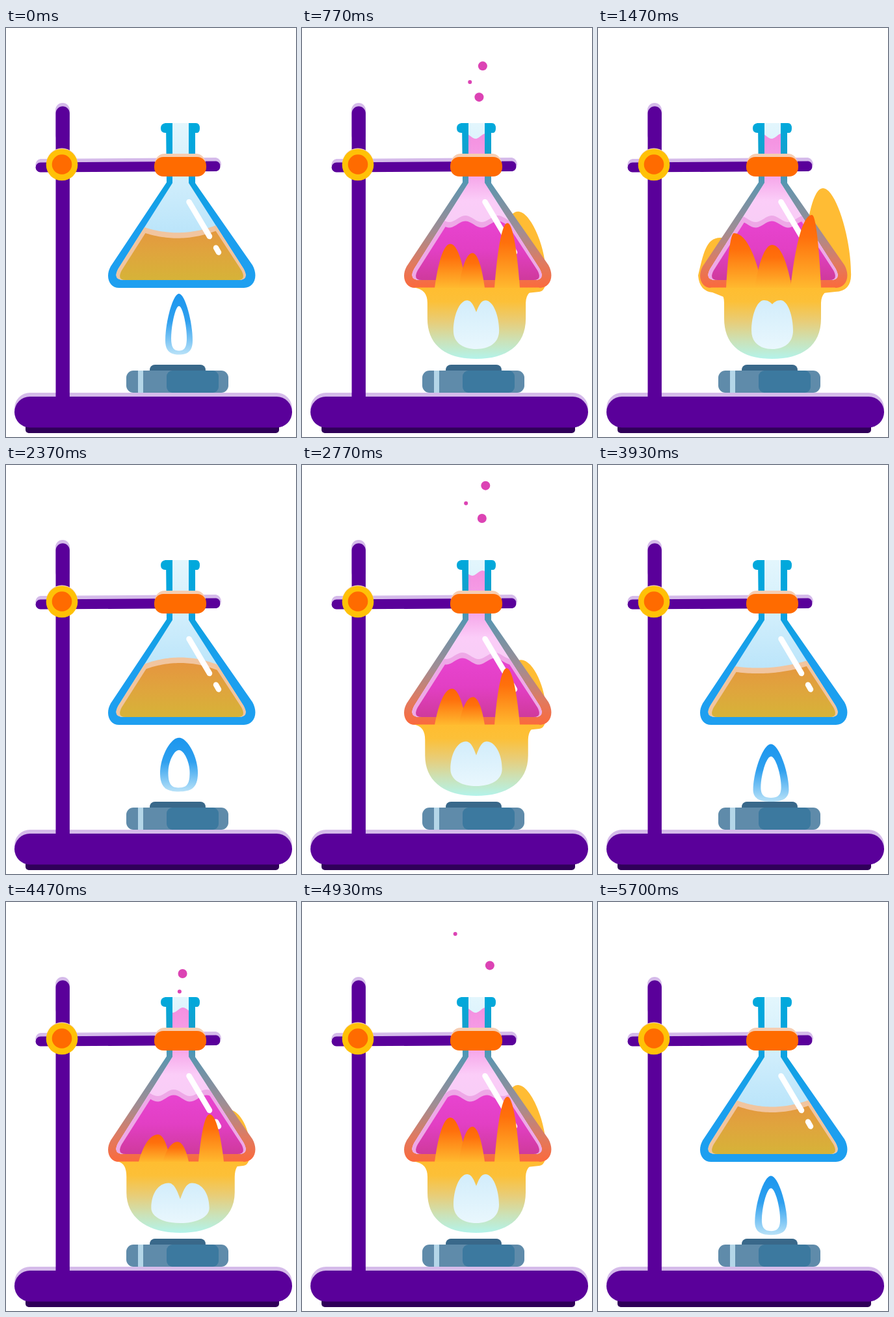
These frames come from a looping animation (446x628 px, 5730 ms). An HTML page:

```html
<!DOCTYPE html>
<html lang="en">
<head>
<meta charset="utf-8">
<title>Flask over a burner</title>
<style>
html, body { margin: 0; width: 100%; height: 100%; overflow: hidden; background: #fff; }
svg { display: block; width: 100vw; height: 100vh; }
</style>
</head>
<body>
<svg viewBox="0 0 446 628">
  <defs>
    <linearGradient id="glassCold" gradientUnits="userSpaceOnUse" x1="0" y1="146" x2="0" y2="399">
      <stop offset="0" stop-color="#00a9dc"/><stop offset=".3" stop-color="#0aa2dd"/>
      <stop offset=".6" stop-color="#1a9fee"/><stop offset="1" stop-color="#1e9ff0"/>
    </linearGradient>
    <linearGradient id="glassHot" gradientUnits="userSpaceOnUse" x1="0" y1="146" x2="0" y2="399">
      <stop offset="0" stop-color="#00a9dc"/><stop offset=".2" stop-color="#16a0cc"/>
      <stop offset=".4" stop-color="#6594ac"/><stop offset=".65" stop-color="#a08d94"/>
      <stop offset=".85" stop-color="#e07a60"/><stop offset="1" stop-color="#fb6a3c"/>
    </linearGradient>
    <linearGradient id="airCold" gradientUnits="userSpaceOnUse" x1="0" y1="146" x2="0" y2="320">
      <stop offset="0" stop-color="#e3f6fd"/><stop offset=".45" stop-color="#d3effc"/>
      <stop offset="1" stop-color="#b9e4fa"/>
    </linearGradient>
    <linearGradient id="airHot" gradientUnits="userSpaceOnUse" x1="0" y1="160" x2="0" y2="300">
      <stop offset="0" stop-color="#f48fe0"/><stop offset=".5" stop-color="#f6a8ea"/>
      <stop offset=".75" stop-color="#fbcdf8"/><stop offset="1" stop-color="#f8cdf6"/>
    </linearGradient>
    <linearGradient id="orange" gradientUnits="userSpaceOnUse" x1="0" y1="305" x2="0" y2="387">
      <stop offset="0" stop-color="#e5963f"/><stop offset=".5" stop-color="#dfa53d"/>
      <stop offset="1" stop-color="#d6b338"/>
    </linearGradient>
    <linearGradient id="pink" gradientUnits="userSpaceOnUse" x1="0" y1="295" x2="0" y2="387">
      <stop offset="0" stop-color="#e844d0"/><stop offset=".5" stop-color="#e23fc4"/>
      <stop offset="1" stop-color="#cf3a9c"/>
    </linearGradient>
    <linearGradient id="tongue" x1="0" y1="0" x2="0" y2="1">
      <stop offset="0" stop-color="#ff6408"/><stop offset=".3" stop-color="#ff700c"/>
      <stop offset="1" stop-color="#ffb92f"/>
    </linearGradient>
    <linearGradient id="bodyFire" gradientUnits="userSpaceOnUse" x1="0" y1="398" x2="0" y2="508">
      <stop offset="0" stop-color="#ffbd30"/><stop offset=".2" stop-color="#fcc038"/>
      <stop offset=".48" stop-color="#e8cd78"/><stop offset=".75" stop-color="#cbe2b8"/>
      <stop offset="1" stop-color="#b3f3ea"/>
    </linearGradient>
    <linearGradient id="coreFire" x1="0" y1="0" x2="0" y2="1">
      <stop offset="0" stop-color="#d2edfb"/><stop offset="1" stop-color="#e9f7fd"/>
    </linearGradient>
    <linearGradient id="blueFire" x1="0" y1="0" x2="0" y2="1">
      <stop offset="0" stop-color="#1b96ee"/><stop offset=".45" stop-color="#2fa0ef"/>
      <stop offset="1" stop-color="#b9e2f8"/>
    </linearGradient>
    <clipPath id="inside"><path d="M256 146V238L173 369Q163 387 181 387H358Q375 387 365 369L281 238V146Z"/></clipPath>
    <clipPath id="inset"><path d="M259 245L178 372Q170 387 184 387H356Q370 387 362 372L279 245Z"/></clipPath>
  </defs>

  <g id="stand">
    <rect x="30" y="606" width="390" height="16" rx="5" fill="#300059"/>
    <rect x="76" y="115" width="22" height="60" rx="11" fill="#d5bbea"/>
    <rect x="13" y="560" width="427" height="50" rx="24" fill="#d5bbea"/>
    <rect x="13" y="566" width="427" height="47.500" rx="23.700" fill="#5a009a"/>
    <path d="M76.500 570V131a10.700 10.700 0 0 1 21.400 0V570Z" fill="#5a009a"/>
    <path d="M53 201L323 199Q331 201 331 211L45 211Q46 202 53 201Z" fill="#d5bbea"/>
    <path d="M53 206.500L323.500 204.500a8 8 0 0 1 0 15.500L53 221.500a7.500 7.500 0 0 1 0 -15Z" fill="#5a009a"/>
    <circle cx="86" cy="208.500" r="24" fill="#f3cfae"/>
    <circle cx="86" cy="210" r="24.300" fill="#ffc107"/>
    <circle cx="86" cy="209.500" r="15.300" fill="#ff6b00"/>
  </g>

  <g id="burner">
    <rect x="221" y="517" width="86" height="16" rx="8" fill="#39688a"/>
    <rect x="185" y="526" width="157" height="34" rx="11" fill="#5f8baa"/>
    <path d="M203 526h8v34h-8Z" fill="#b4d6e8"/>
    <rect x="247" y="526" width="80" height="34" rx="9" fill="#3c799f"/>
  </g>

  <g id="drops" fill="#dc43b4"></g>
  <g id="fireBack" fill="#ffbc34"><path id="plume"/><path id="bulge"/></g>

  <g id="flask">
    <path id="glass" d="M246 146H291V238L379 364C389 382 381 399 366 399H174C159 399 152 382 161 366L247 237Z
      M245 146H292Q298 146 298 154T292 161H245Q238 161 238 154T245 146Z"/>
    <g clip-path="url(#inside)">
      <rect x="150" y="146" width="240" height="245" fill="url(#airCold)"/>
      <path id="vapour" fill="url(#airHot)"/>
      <path id="rim"/>
    </g>
    <path id="liquid" clip-path="url(#inset)"/>
    <path d="M281.500 267L313 320M323 337.500L327 344.500" stroke="#fff" stroke-width="8.500" stroke-linecap="round"/>
    <rect x="229" y="193" width="78" height="30" rx="15" fill="#f6cdb2"/>
    <rect x="228" y="198" width="80" height="30" rx="14" fill="#ff6b00"/>
  </g>

  <g id="fireFront">
    <path id="body" fill="url(#bodyFire)"/>
    <g fill="url(#tongue)"><path id="left"/><path id="mid"/><path id="right"/></g>
    <path id="core" fill="url(#coreFire)"/>
  </g>
  <g id="flame">
    <path id="outer" fill="url(#blueFire)"/>
    <path id="inner" fill="#fff"/>
  </g>
</svg>
<script>
const LOOP = 5730, FRAMES = 143, CYCLE = FRAMES / 3;
const BURST = 12, CALM = 39;
const BOB = BURST * 0.472, SLOSH = 24.6, FLICKER = 8.33;
const TAU = Math.PI * 2;

const el = id => document.getElementById(id);
const put = (id, d) => el(id).setAttribute('d', d);
const fill = (id, value) => el(id).setAttribute('fill', value);
const show = (node, on) => node.setAttribute('visibility', on ? 'visible' : 'hidden');
const clamp = v => Math.min(1, Math.max(0, v));

const drops = [0, 1, 2].map(i => {
  const small = i % 2;
  const node = document.createElementNS('http://www.w3.org/2000/svg', 'circle');
  node.setAttribute('r', small ? 3 : 7);
  el('drops').appendChild(node);
  return { node, launch: 13.8 + 1.44 * i, fall: 0.72 * 1.43 ** i, drift: small ? -2.6 : 1.9 };
});

function tear(cx, top, bottom, w, wide) {
  const h = bottom - top, y = top + h * wide;
  return `M${cx} ${top}C${cx + w * .45} ${top} ${cx + w} ${y - h * .3} ${cx + w} ${y}` +
    `C${cx + w} ${bottom - h * .05} ${cx + w * .6} ${bottom} ${cx} ${bottom}` +
    `C${cx - w * .6} ${bottom} ${cx - w} ${bottom - h * .05} ${cx - w} ${y}` +
    `C${cx - w} ${y - h * .3} ${cx - w * .45} ${top} ${cx} ${top}Z`;
}

function spike(x0, x, y, x1) {
  const h = 399 - y, a = x - x0, b = x1 - x;
  return `M${x0} 399C${x0 + a * .18} ${y + h * .52} ${x - a * .48} ${y} ${x} ${y}` +
    `C${x + b * .48} ${y} ${x1 - b * .18} ${y + h * .52} ${x1} 399Z`;
}

function surface(height, from, to, bottom) {
  let d = `M${from} ${bottom}`;
  for (let x = from; x <= to; x += 3) d += `L${x} ${height(x).toFixed(2)}`;
  return d + `V${bottom}Z`;
}

// 0 while the fire stands tall, 1 while it squats
const squat = p => (1 - Math.cos((p - 36) * TAU / FLICKER)) / 2;

function drawLiquid(hot, p) {
  let height;
  if (hot) {
    height = x => 293 - 5 * Math.cos((x - 284 + 2 * (p - 27.67)) * TAU / 50);
    const dip = 267 - 11 * squat(p);
    put('vapour', surface(x => 166 + 4 * Math.cos((x - dip) / 5), 256, 283, 240) +
      'M150 238H390V390H150Z');
  } else {
    const a = (p + 1) * TAU / SLOSH;
    const tilt = -6.5 * Math.sin(a), bend = -12 * Math.cos(a), edge = 305 - 2.5 * Math.cos(a);
    height = x => {
      const u = (x - 268) / 60;
      return edge + tilt * u + bend * (u * u - 1);
    };
  }
  show(el('vapour'), hot);
  put('rim', surface(height, 150, 390, 390));
  put('liquid', surface(x => height(x) + 8.5, 150, 390, 390));
  fill('rim', hot ? '#eea8e7' : '#f1c59f');
  fill('liquid', hot ? 'url(#pink)' : 'url(#orange)');
  fill('glass', hot ? 'url(#glassHot)' : 'url(#glassCold)');
}

function drawBig(p) {
  const k = squat(p);
  const grow = Math.max(0, (p - 27.67) / FLICKER);
  const rise = 1 - (1 - clamp((p - BURST + 1) / 4)) ** 3;
  const tip = y => 398 - (398 - y) * rise;

  put('left', spike(204 - 7 * grow, 228 - 19 * grow + 6 * k, tip(331 - 16 * grow + 27 * k), 253));
  put('mid', spike(241, 262 + 6 * grow + 2 * k, tip(345 - 12 * grow + 24 * k), 281 + 17 * grow));
  put('right', spike(296, 316 + 13 * grow - 3 * k, tip(299 - 12 * grow + 28 * k), 335 + 8 * grow));

  const px = 332 + 14 * grow + 10 * k, py = tip(281 - 35 * grow + 39 * k);
  const edge = 375 + 14 * grow, h = 375 - py;
  put('plume', `M${px - 35} 402C${px - 28} ${py + h * .5} ${px - 18} ${py} ${px} ${py}` +
    `C${px + 20} ${py} ${edge} ${py + h * .6} ${edge} 375Q${edge + 2} 404 365 405L300 412Z`);

  const swell = clamp((grow - .6) / .4);
  const bx = 185 - 31 * swell, by = 398 - 76 * swell;
  put('bulge', `M210 408V${by}H188C${bx + 12} ${by} ${bx + 8} ${by + 25} ${bx} ${by + 58}` +
    `Q${bx + 2} 404 176 406L196 414Z`);
  show(el('bulge'), swell > 0);

  const side = 193 + grow - 8 * k, far = 537 - side;
  put('body', `M172 398.500Q${side} 401 ${side} 422V446C${side} 488 222 508 268 508` +
    `S${far} 488 ${far} 446V422Q${far} 403 366 398.500Z`);

  const w = 35 - 3 * grow + 10 * k, top = 418 + 14 * k, notch = 436 - 12 * grow + 21 * k;
  const base = 493, y = base - (base - top) * .38;
  const lobe = s => {
    const at = f => 268 + s * w * f;
    return `M268 ${notch}C${at(.1)} ${(top + notch) / 2} ${at(.2)} ${top} ${at(.4)} ${top}` +
      `C${at(.75)} ${top} ${at(1)} ${y - 22} ${at(1)} ${y}` +
      `C${at(1)} ${base - 9} ${at(.55)} ${base} 268 ${base}Z`;
  };
  put('core', lobe(1) + lobe(-1));
}

function drawSmall(p) {
  const lift = ((1 + Math.cos(p * TAU / BOB)) / 2) ** 3;
  const swell = (Math.max(0, p) / BURST) ** 2;
  const top = 428 - 20 * lift + 12 * swell, bottom = 517 - 15.5 * lift;
  const w = 27 - 6 * lift + 9 * swell, wide = .8 - .03 * lift - .13 * swell;
  put('outer', tear(266, top, bottom, w, wide));
  put('inner', tear(266, top + 19, bottom - 6, w * .57, wide - .05));
}

function drawDrops(p) {
  for (const { node, launch, fall, drift } of drops) {
    const age = p - launch;
    node.setAttribute('cx', 268 + drift * age);
    node.setAttribute('cy', 146 - 20.6 * age + fall * age * age);
    show(node, age > 0 && age < 13);
  }
}

// 25 pictures a second on a 30 Hz clock: every sixth tick repeats a picture
function pictureAt(ms) {
  const tick = Math.floor(ms * .03 + .15);
  return Math.min(FRAMES - 1, Math.floor(tick / 6) * 5 + Math.max(0, tick % 6 - 1));
}

function draw(ms) {
  const p = pictureAt(ms % LOOP) % CYCLE;
  const hot = p >= BURST && p < CALM;
  const rest = p >= CALM ? p - CYCLE : p;
  drawLiquid(hot, hot ? p : rest);
  if (hot) drawBig(p);
  else {
    drawSmall(rest);
    show(el('bulge'), false);
  }
  drawDrops(p);
  show(el('fireBack'), hot);
  show(el('fireFront'), hot);
  show(el('flame'), !hot);
}

const start = performance.now();
function tick() {
  draw(performance.now() - start);
  requestAnimationFrame(tick);
}
tick();
</script>
</body>
</html>
```
